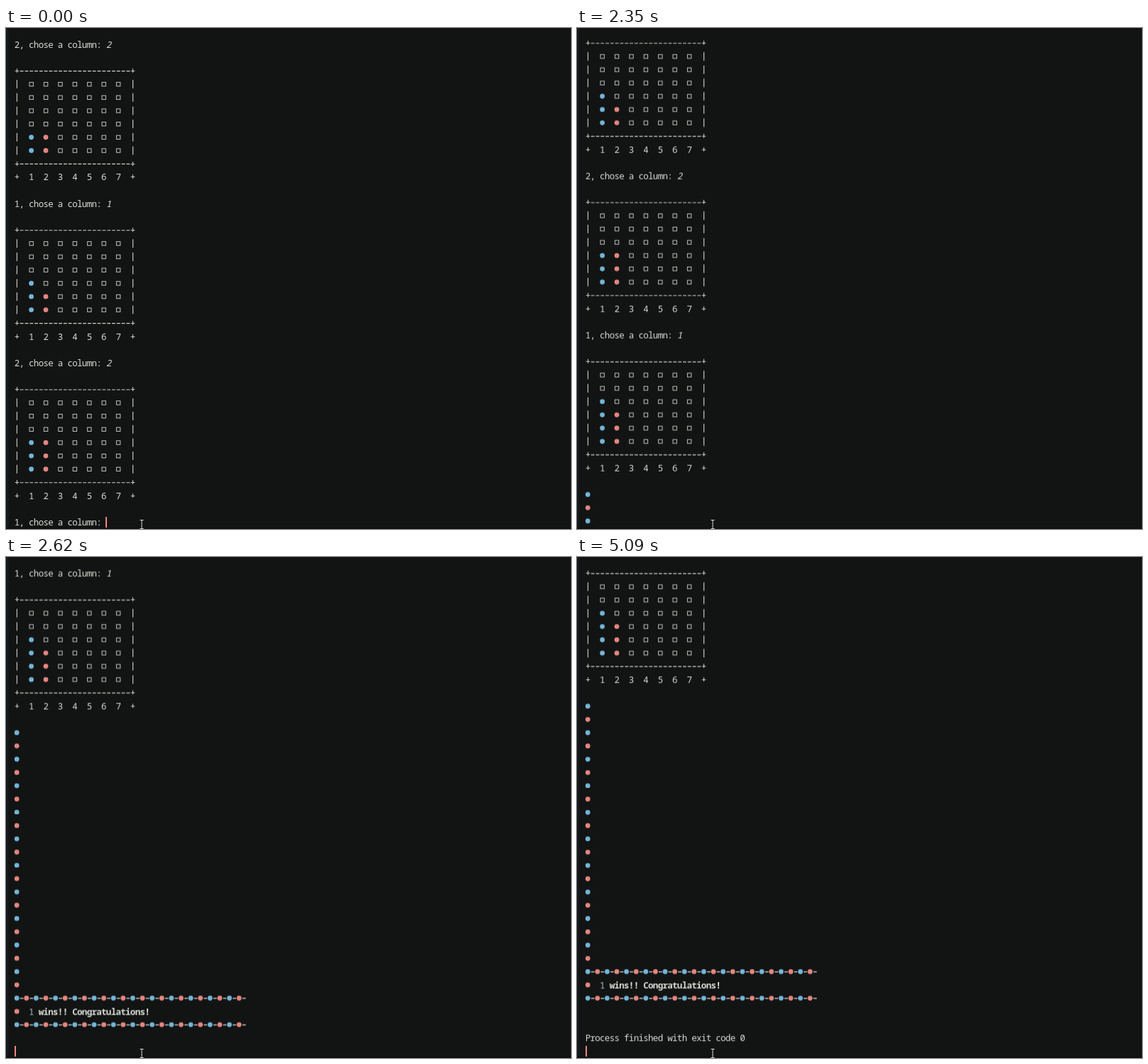
An HTML page that plays this animation: 795 by 705 pixels, repeating every 5.44 s.

```html
<!DOCTYPE html>
<html lang="en">
<head>
<meta charset="utf-8">
<title>Four in a row console</title>
<style>
  html, body { margin: 0; width: 100%; height: 100%; overflow: hidden; background: #121414; }
  svg { display: block; width: 795px; height: 705px; }
  text {
    font: 12.5px "Noto Sans Mono", "DejaVu Sans Mono", monospace;
    letter-spacing: -0.7px;
    fill: #d9dad2;
    white-space: pre;
  }
  .answer { font-style: italic; }
  .bold { font-weight: 700; }
  .winner { fill: #a9bccb; }
  .cell { fill: none; stroke: #c0c1b8; }
  .rule { stroke: #cfd0c8; stroke-width: 1.1; }
  .blue { fill: #74b5d8; }
  .red { fill: #e5867f; }

  #log, #late, #typed, #caret { animation: 5440ms step-end infinite; }
  #log { animation-name: scroll; }
  #late { animation-name: late; }
  #typed { animation-name: typed; }
  #caret { animation-name: move, blink; fill: #ec8580; }

  @keyframes scroll {
    0% { transform: translateY(0); }
    43.198% { transform: translateY(-263.3px); }
    44.485% { transform: translateY(-429.6px); }
    47.058% { transform: translateY(-579px); }
    48.161% { transform: translateY(-672.5px); }
    55.514%, 100% { transform: translateY(-709.8px); }
  }
  @keyframes late {
    0% { opacity: 0; }
    47.058%, 100% { opacity: 1; }
  }
  @keyframes typed {
    0% { opacity: 0; }
    30.882%, 100% { opacity: 1; }
  }
  @keyframes move {
    0% { transform: translateX(140px); }
    30.882% { transform: translateX(147px); }
    43.198%, 100% { transform: translateX(12px); }
  }
  @keyframes blink {
    0%, 19.669%, 30.882%, 44.485%, 48.161%, 56.985%, 75.367%, 93.566%, 100% { opacity: 1; }
    9.742%, 28.308%, 43.198%, 47.058%, 55.514%, 65.441%, 84.926% { opacity: 0; }
  }
</style>
</head>
<body>
<svg viewBox="0 0 795 705">
  <clipPath id="pane"><rect width="795" height="703"/></clipPath>
  <rect width="2" height="705" fill="#15181a"/>
  <rect x="2" width="1" height="705" fill="#1c2022"/>
  <g clip-path="url(#pane)">
    <g id="log"><g id="late"></g></g>
    <rect id="caret" y="688" width="2" height="15"/>
  </g>
  <rect y="703" width="795" height="2" fill="#130e0f"/>
  <path d="M188.5 692.5h5M191 693v11M188.5 704.5h5" fill="none" stroke="#d8d8d8"/>
</svg>
<script>
  const CHAR = 6.8, LINE = 18.68, LEFT = 12, TOP = 23;
  const log = document.getElementById('log');
  const late = document.getElementById('late');

  const colX = col => LEFT + col * CHAR;
  const midX = col => colX(col + 0.5);
  const lineY = line => TOP + line * LINE;

  function add(parent, tag, attrs, content) {
    const el = document.createElementNS('http://www.w3.org/2000/svg', tag);
    for (const key in attrs) el.setAttribute(key, attrs[key]);
    if (content) el.textContent = content;
    return parent.appendChild(el);
  }

  function write(parent, line, col, content, cls = '') {
    return add(parent, 'text', { x: colX(col) - 0.35, y: lineY(line) + 4.6, class: cls }, content);
  }

  function disc(parent, line, col, color) {
    add(parent, 'circle', { cx: midX(col) - 0.2, cy: lineY(line), r: 3.4, class: color });
  }

  function border(line) {
    write(log, line, 0, '+');
    write(log, line, 24, '+');
    add(log, 'path', {
      d: `M${colX(1) + 1} ${lineY(line) + 0.3}H${colX(24)}`,
      'stroke-dasharray': '4.8 2', class: 'rule'
    });
  }

  function board(top, blues, reds) {
    border(top);
    for (let row = 0; row < 6; row++) {
      const line = top + 1 + row, y = lineY(line);
      for (const col of [0, 24])
        add(log, 'path', { d: `M${midX(col)} ${y - 6}v12`, class: 'rule' });
      for (let slot = 0; slot < 7; slot++) {
        const col = 3 + slot * 3;
        const filled = row >= 6 - [blues, reds, 0, 0, 0, 0, 0][slot];
        if (filled) disc(log, line, col, slot ? 'red' : 'blue');
        else add(log, 'rect', { x: midX(col) - 2.8, y: y - 2.6, width: 5.4, height: 5.4, class: 'cell' });
      }
    }
    border(top + 7);
    write(log, top + 8, 0, '+  1  2  3  4  5  6  7  +');
  }

  function prompt(line, player) {
    write(log, line, 0, player + ', chose a column:');
    return write(log, line, 19, player, 'answer');
  }

  function band(line) {
    for (let i = 0; i < 24; i++) {
      disc(late, line, i * 2, i % 2 ? 'red' : 'blue');
      add(late, 'path', {
        d: `M${midX(i * 2 + 1) - 2.4} ${lineY(line) + 0.3}h4.8`,
        class: 'rule', style: 'stroke-width:1.4'
      });
    }
  }

  prompt(0, '2');
  board(2, 2, 2);
  prompt(12, '1');
  board(14, 3, 2);
  prompt(24, '2');
  board(26, 3, 3);
  prompt(36, '1').id = 'typed';
  board(38, 4, 3);

  for (let line = 48; line < 68; line++)
    disc(line < 59 ? log : late, line, 0, line % 2 ? 'red' : 'blue');

  band(68);
  disc(late, 69, 0, 'red');
  write(late, 69, 3, '1', 'winner');
  write(late, 69, 5, 'wins!! Congratulations!', 'bold');
  band(70);
  write(late, 73, 0, 'Process finished with exit code 0');
</script>
</body>
</html>
```
